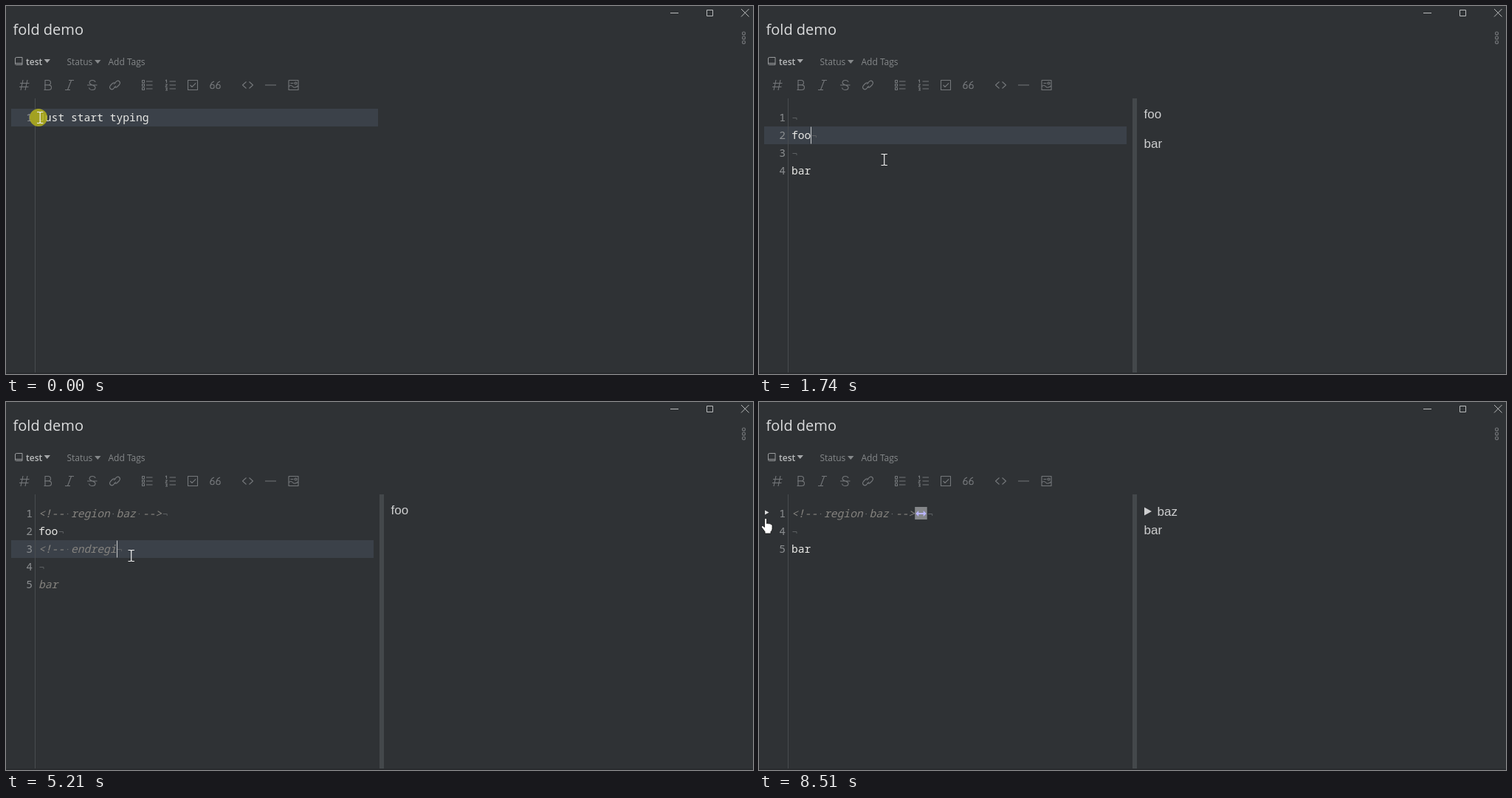
Recreate the animation shown at these times as an HTML page. Size 1012 px wide and 498 px high, loop 8.58 s.

```html
<!DOCTYPE html>
<html lang="en">
<head>
<meta charset="utf-8">
<title>fold demo</title>
<style>
html, body { margin: 0; width: 100%; height: 100%; overflow: hidden; background: #2f3235; }
svg { display: block; width: 1012px; height: 498px; }
text { white-space: pre; }
.ui { font: 12px "Open Sans", "Noto Sans", sans-serif; fill: #85888a; }
.code { font: 14.667px "Noto Sans Mono", monospace; fill: #e9e9e6; }
.comment { font-style: italic; fill: #85837f; }
.number { fill: #8b8e90; text-anchor: end; }
.preview { font: 17px "Liberation Sans", Arial, sans-serif; fill: #cdcecf; }
.icon { fill: none; stroke: #74777a; stroke-width: 1.1; stroke-linejoin: round; }
</style>
</head>
<body>
<svg viewBox="0 0 1012 498">
  <rect width="1012" height="498" fill="#2f3235"/>
  <text x="9.500" y="39" style="font:20px 'Open Sans','Noto Sans',sans-serif" fill="#dcddde">fold demo</text>
  <g fill="none" stroke="#b9bbbc">
    <path d="M900 9.500h11M949.500 5.500h8v8h-8zM996 4l10.500 10.500M1006.500 4L996 14.500"/>
    <path d="M14.500 69.500h7.500v10h-8.500q-1 0-1-1v-7.500q0-1.500 2-1.500M13 77.500h9" stroke="#9a9c9e"/>
  </g>
  <g class="icon">
    <circle cx="999.500" cy="37" r="2"/><circle cx="999.500" cy="43" r="2"/><circle cx="999.500" cy="49" r="2"/>
  </g>
  <text class="ui" x="27" y="80" style="font-weight:600;fill:#b9bbbc">test</text>
  <text class="ui" x="82.500" y="80">Status</text>
  <text class="ui" x="138.500" y="80">Add Tags</text>
  <path d="M51.500 72h8.500l-4.250 5z" fill="#a5a7a9"/>
  <path d="M120 73h8.500l-4.250 5z" fill="#85888a"/>
  <g class="icon">
    <path d="M23 100l-3 14M29 100l-3 14M19 104.500h12.500M18 109.500h12.500"/>
    <path d="M52.500 100.500h4.500q3.500 0 3.500 3.200t-3.500 3.200h-4.500h5q4 0 4 3.300t-4 3.300h-6M53 100.500v13"/>
    <path d="M85 100.500h7M80 113.500h7M88.500 100.500l-5 13"/>
    <path d="M121 103q-.5-2.500-4-2.500t-4 3q0 2 4 3.500t4 3.500q0 3-4 3t-4.500-3M110 107h13.500"/>
    <path d="M146 106l3-3.500q2.500-2.500 4.500-.5t0 4.500l-3 3q-2 1.500-4 0M149 108l-3 3.500q-2.500 2.500-4.500.5t0-4.500l3-3q2-1.500 4 0"/>
    <path d="M184.500 100.500h3v3h-3zM184.500 105.500h3v3h-3zM184.500 110.500h3v3h-3zM190 102h8.500M190 107h8.500M190 112h8.500"/>
    <path d="M216 101l1.500-1v4M216 106h2.500l-2.500 3h2.500M216 111h2.500l-1 1.500 1 1.500h-2.500M221.500 102h8.500M221.500 107h8.500M221.500 112h8.500"/>
    <path d="M246.500 100.500h13v13h-13zM249.500 107l2.500 2.500 5-5"/>
    <path d="M282 102q-4.500 1.500-5 6.500M290 102q-4.500 1.500-5 6.500"/>
    <circle cx="279.500" cy="109" r="2.700"/><circle cx="287.500" cy="109" r="2.700"/>
    <path d="M325.500 102.500l-5 4.500 5 4.500M329.500 102.500l5 4.500-5 4.500M351 107h15"/>
    <path d="M383.500 100.500h12.500v13h-13v-12.500zM383 109q3-3 5.500 0t7.500-1M385.500 104.500h4"/>
    <circle cx="392.500" cy="104.500" r="1.500"/>
  </g>
  <rect id="active" x="7" height="24" fill="#3b4149"/>
  <path d="M39.500 125v373" stroke="#484c4f"/>
  <rect id="split" x="506" y="125" width="6" height="373" fill="#44484b"/>
  <path d="M0 497h1012" stroke="#292b2e" stroke-width="2"/>
  <g id="editor"></g>
  <g id="preview"></g>
  <rect id="caret" width="1" height="23" fill="#c9cbcd"/>
  <circle id="halo" r="12" fill="#b3b11c" opacity=".86"/>
  <g id="mouse">
    <path id="beam" d="M-4-7.500h3.200l1 1 1-1h3.200M-4 7.500h3.200l1-1 1 1h3.200M.2-6.500v13" fill="none" stroke="#eee" stroke-width="1.200"/>
    <path id="arrow" d="M0 0v16.500l3.800-3.600 2.600 6 2.700-1.200-2.600-5.700h5.300z" fill="#fff" stroke="#111" stroke-width=".9"/>
    <path id="hand" d="M-2.500 1q0-1.700 1.500-1.700T.500 1v5.500q1.500-1 3 .3 1.300-.8 2.600.7 1.900-.2 1.900 1.800v4.200q0 2.500-2 4v2.500h-8v-2.500l-4.500-6q-.8-2.200 1.500-2l2.500 2z" fill="#fff" stroke="#111" stroke-width=".8"/>
  </g>
</svg>
<script>
const LOOP = 8580, CHAR = 8.8, LEFT = 44, ROW = 24, TOP = 139;
const PREVIEW_LAG = 70, SPLIT_AT = 420, OPEN_AT = 6510, CLOSE_AT = 7160, FOLD_AT = 7860;
const $ = id => document.getElementById(id);
const show = (id, on) => $(id).setAttribute("visibility", on ? "visible" : "hidden");
const place = (id, attrs) => Object.entries(attrs).forEach(([k, v]) => $(id).setAttribute(k, v));
const escapeText = s => s.replace(/&/g, "&amp;").replace(/</g, "&lt;");
const text = (cls, x, y, s) => `<text class="${cls}" x="${x}" y="${y}">${escapeText(s)}</text>`;
const shape = (d, fill) => `<path d="${d}" fill="${fill}"/>`;

// Each run is [text, time of first key, ms per key].
const typed = (t, ...runs) => runs.map(([s, start, step]) =>
  s.slice(0, Math.max(0, Math.floor((t - start) / step) + 1))).join("");

function documentAt(t) {
  if (t < 350) return ["Just start typing"];
  if (t < 490) return [""];
  const lines = [
    typed(t, ["<!-- reg", 1950, 105], ["ion baz", 2790, 78], [" -->", 3480, 70]),
    typed(t, ["foo", 560, 100])
  ];
  if (t >= 3970) lines.push(typed(t, ["<!-", 4180, 140], ["- endregion -->", 4605, 67.5]));
  if (t >= 1040) lines.push("");
  if (t >= 1110) lines.push(typed(t, ["bar", 1250, 70]));
  return lines;
}

// [time, line the caret moves to]
const caretMoves = [[0, 0], [490, 1], [1040, 2], [1110, 3], [1600, 2], [1670, 1], [1810, 0], [3830, 1], [3970, 2]];
const caretLine = t => caretMoves.filter(m => m[0] <= t).pop()[1];

const mousePath = [[0, 46, 151], [70, 46, 151], [350, 169.5, 208], [5840, 169.5, 208],
  [6320, 503, 168], [6520, 527, 148], [7170, 527, 148], [7730, 10, 151], [8505, 10, 151], [8510, 10, 158], [LOOP, 10, 158]];

function mouseAt(t) {
  const i = mousePath.findIndex(p => p[0] > t);
  const [t0, x0, y0] = mousePath[i - 1], [t1, x1, y1] = mousePath[i];
  const u = (t - t0) / (t1 - t0), e = u * u * (3 - 2 * u);
  return { x: x0 + (x1 - x0) * e, y: y0 + (y1 - y0) * e, moving: x0 !== x1 };
}

const regionDone = lines => lines.join("\n").match(/<!-- region (\w+) -->[^]*endregion -->/);

function editorMarkup(lines, folded) {
  let out = "", row = 0, open = false;
  lines.forEach((line, i) => {
    const marker = line.includes("<!--");
    open = open || marker;
    const comment = open;
    if (line.includes("-->")) open = false;
    if (folded && (i === 1 || i === 2)) return;
    const y = TOP + ROW * row++, base = y + 17;
    let end = LEFT + line.length * CHAR;
    out += text("code number", 36, base, String(i + 1));
    out += text(comment ? "code comment" : "code", LEFT, base, line);
    if (marker) [...line].forEach((c, n) => {
      if (c === " ") out += `<circle cx="${LEFT + (n + .5) * CHAR}" cy="${y + 12.5}" r=".8" fill="#6a6d70"/>`;
    });
    if (folded && i === 0) {
      out += shape(`M${end} ${y + 3}h16.500v17h-16.500z`, "#85878a");
      out += shape(`M${end + 1} ${y + 12}l4-4v3h6.500v-3l4 4-4 4v-3h-6.500v3z`, "#b9b5ff");
      end += 16.5;
    }
    if (i < lines.length - 1)
      out += `<path d="M${end + 1.5} ${y + 12.5}h5.500v2.500" fill="none" stroke="#5d6063"/>`;
  });
  if (regionDone(lines))
    out += shape(folded ? "M8 146.500l5.500 3-5.500 3z" : "M7.800 147h5.400l-2.700 5.500z", "#dddede");
  return out;
}

function previewMarkup(lines, t) {
  const region = regionDone(lines);
  if (!region) {
    const visible = lines.join("\n").replace(/<!--[^]*?(-->|$)/g, "");
    return visible.split(/\n\s*\n/).map(p => p.trim().replace(/\n/g, " ")).filter(Boolean)
      .map((p, i) => text("preview", 521.5, 152 + 40 * i, p)).join("");
  }
  const open = t >= OPEN_AT && t < CLOSE_AT;
  let out = shape(open ? "M522.500 144h11l-5.500 9z" : "M522 142.500l10 5.500-10 5.500z", "#cdcecf");
  out += text("preview", 539.5, 154, region[1]);
  (open ? ["foo", "bar"] : ["bar"]).forEach((s, i) => out += text("preview", 521.5, 179 + ROW * i, s));
  if (t >= OPEN_AT && t < FOLD_AT)
    out += `<rect x="520.500" y="133.500" width="490" height="30" rx="3" fill="none" stroke="#f5efe2"/>
      <rect x="522" y="135" width="487" height="27" rx="2" fill="none" stroke="#e59700" stroke-width="2"/>`;
  return out;
}

function draw(t) {
  const lines = documentAt(t), folded = t >= FOLD_AT, split = t >= SPLIT_AT;
  const line = caretLine(t), y = TOP + ROW * line;
  $("editor").innerHTML = editorMarkup(lines, folded);
  $("preview").innerHTML = split ? previewMarkup(documentAt(t - PREVIEW_LAG), t) : "";
  show("split", split);
  show("active", !folded);
  place("active", { y, width: split ? 491 : 497 });
  show("caret", t >= 350 && t < 900 || t >= 1040 && t < 5700);
  place("caret", { x: Math.round(LEFT + lines[line].length * CHAR), y: y + .5 });

  const m = mouseAt(t);
  const kind = m.x < 22 ? "hand" : m.x < 505 ? "beam" : "arrow";
  ["hand", "beam", "arrow"].forEach(k => show(k, k === kind));
  place("mouse", { transform: `translate(${m.x} ${m.y})` });
  show("halo", t < 70 || m.moving || t >= 7730 && t < 8505);
  place("halo", { cx: m.x - 2, cy: m.y });
}

function tick() {
  draw(performance.now() % LOOP);
  requestAnimationFrame(tick);
}
tick();
</script>
</body>
</html>
```
